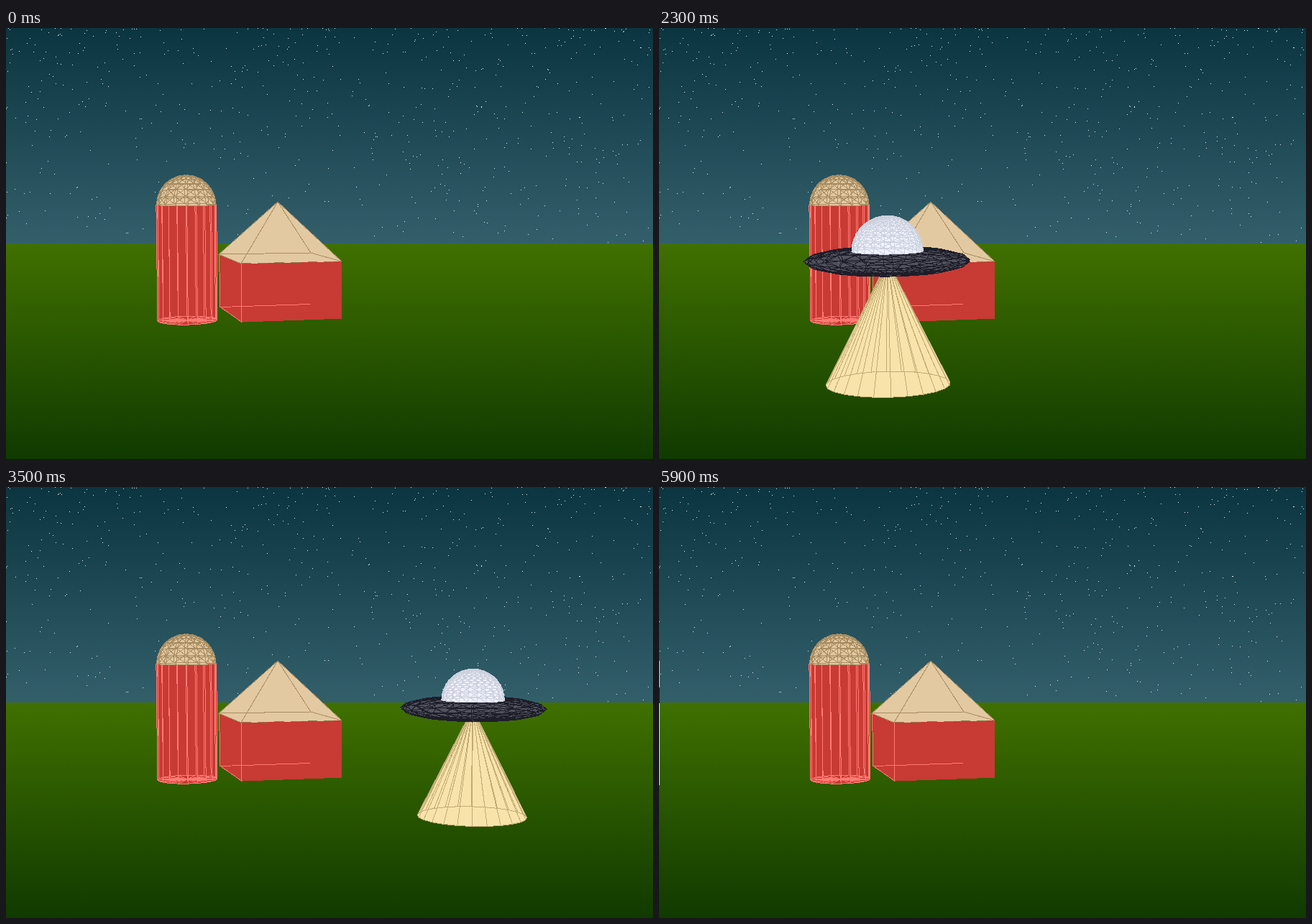
An HTML page for the animation above (6 s loop, 900 px wide and 600 px high).

```html
<!DOCTYPE html>
<html lang="en">
<head>
<meta charset="utf-8">
<title>Saucer over the farm</title>
<style>
  html, body { margin: 0; width: 100%; height: 100%; overflow: hidden; }
  svg { display: block; }
  path { shape-rendering: crispEdges; }
</style>
</head>
<body>
<svg id="stage" width="900" height="600" viewBox="0 0 900 600">
  <defs>
    <linearGradient id="sky" x2="0" y2="1">
      <stop stop-color="#0b3540"/><stop offset="1" stop-color="#335f6b"/>
    </linearGradient>
    <linearGradient id="grass" x2="0" y2="1">
      <stop stop-color="#407000"/><stop offset="1" stop-color="#103a00"/>
    </linearGradient>
  </defs>
  <rect width="900" height="300" fill="url(#sky)"/>
  <rect y="300" width="900" height="300" fill="url(#grass)"/>
</svg>
<script>
const TAU = Math.PI * 2, LOOP = 6000, STEP = 100;
const FOCAL = 1400, PITCH = 0.072, SIN = Math.sin(PITCH), COS = Math.cos(PITCH);
const stage = document.getElementById("stage");

function addPath(fill, stroke = "none", d = "") {
  const path = document.createElementNS("http://www.w3.org/2000/svg", "path");
  path.setAttribute("fill", fill);
  path.setAttribute("stroke", stroke);
  path.setAttribute("d", d);
  return stage.appendChild(path);
}

const line = points => "M" + points.map(p => p.map(v => v.toFixed(1))).join(" ");

// Rings of a surface of revolution: [radius, distance below the camera], from the pole down
const roundRings = (radius, height, y, rows, sweep) =>
  Array.from({ length: rows + 1 }, (_, i) => {
    const a = i / rows * sweep;
    return [radius * Math.sin(a), y - height * Math.cos(a)];
  });

// Perspective seen by a camera that looks slightly down
function project({ rings, sides }, x, depth) {
  return rings.map(([radius, y]) =>
    Array.from({ length: sides + 1 }, (_, i) => {
      const a = (i + 0.5) / sides * TAU;
      const far = depth + radius * Math.sin(a) / FOCAL;
      const z = far * COS + y * SIN / FOCAL;
      return [450 + (x + radius * Math.cos(a)) / z, 300 + (y * COS - far * FOCAL * SIN) / z];
    }));
}

function wireframe(grid, { sides, diagonals }) {
  const columns = Array.from({ length: sides }, (_, i) => i);
  const lines = [...grid, ...columns.map(i => grid.map(row => row[i]))];
  if (diagonals) lines.push(...columns.map(i => grid.map((row, j) => row[(i + j) % sides])));
  return lines.map(line).join("");
}

function hull(points) {
  const sorted = [...points].sort((a, b) => a[0] - b[0] || a[1] - b[1]);
  const half = list => {
    const out = [];
    for (const p of list) {
      while (out.length > 1) {
        const [a, b] = out.slice(-2);
        if ((b[0] - a[0]) * (p[1] - a[1]) > (b[1] - a[1]) * (p[0] - a[0])) break;
        out.pop();
      }
      out.push(p);
    }
    return out;
  };
  return [...half(sorted), ...half(sorted.reverse())];
}

function addSolid(fill, wire, rings, sides, diagonals, smear = wire) {
  return { rings, sides, diagonals, body: addPath(fill), mesh: addPath("none", wire), edge: addPath(smear) };
}

function drawSolid(solid, x, depth) {
  const grid = project(solid, x, depth), points = grid.flat();
  solid.body.setAttribute("d", line(hull(points)) + "Z");
  solid.mesh.setAttribute("d", wireframe(grid, solid));
  // Whatever passes the right border wraps into the first pixel column
  const beyond = points.filter(p => p[0] >= 900).map(p => p[1]);
  const top = Math.min(...beyond), bottom = Math.max(...beyond);
  solid.edge.setAttribute("d", beyond.length ? `M0 ${top}H1V${bottom}H0Z` : "");
}

// Stars, denser towards the top
let seed = 7;
const random = () => (seed = seed * 16807 % 2147483647) / 2147483647;
let stars = "";
for (let i = 0; i < 600; i++) {
  stars += `M${Math.floor(random() * 900)} ${Math.floor(299 * random() ** 1.5)}h1v1h-1z`;
}
addPath("#e6f2f2", "none", stars);

// Silo
const silo = addSolid("#c83a34", "#ff7a72", [[41.5, 47], [41.5, 209], [0, 209]], 20);
const siloRoof = addSolid("#e3c9a1", "#a88d62", roundRings(41, 41.5, 47, 6, TAU / 4), 16, true);
for (const part of [silo, siloRoof]) drawSolid(part, -199, 1);

// Barn
addPath("#c83a34", "none", "M296 315L327 328 467 325V404.6L327 409.6 298 388Z");
addPath("none", "#ff7a72", "M327.5 328V409L298 388.5 423 384.5M296.5 315L298 388");
addPath("#e3c9a1", "none", "M378 242L467 325 327 328 296 315Z");
addPath("none", "#a88d62", "M327 328L378 242 296 315 424 313 467 325 378 242 424 313M296 315L327 328");
addPath("none", "#8c7a48", "M327 328L467 325").setAttribute("stroke-dasharray", "14 9");

// Saucer
const saucer = [
  addSolid("#f8e3ab", "#c2ab74", [[0, 125], [87.2, 299]], 24, false, "#f8e3ab"),
  addSolid("#52525e", "#1e1e2a", roundRings(115.6, 19.2, 125, 8, TAU / 2), 20, true),
  addSolid("#f0f3ff", "#cdd1de", roundRings(49.7, 50, 112, 9, TAU / 4), 22, true)
];

function render(now) {
  const time = Math.floor(now % LOOP / STEP) * STEP;
  const k = (time - 2300) / 800;
  for (const part of saucer) drawSolid(part, -132.5 + 241 * k, 1 + 0.097 * k);
  requestAnimationFrame(render);
}
requestAnimationFrame(render);
</script>
</body>
</html>
```
